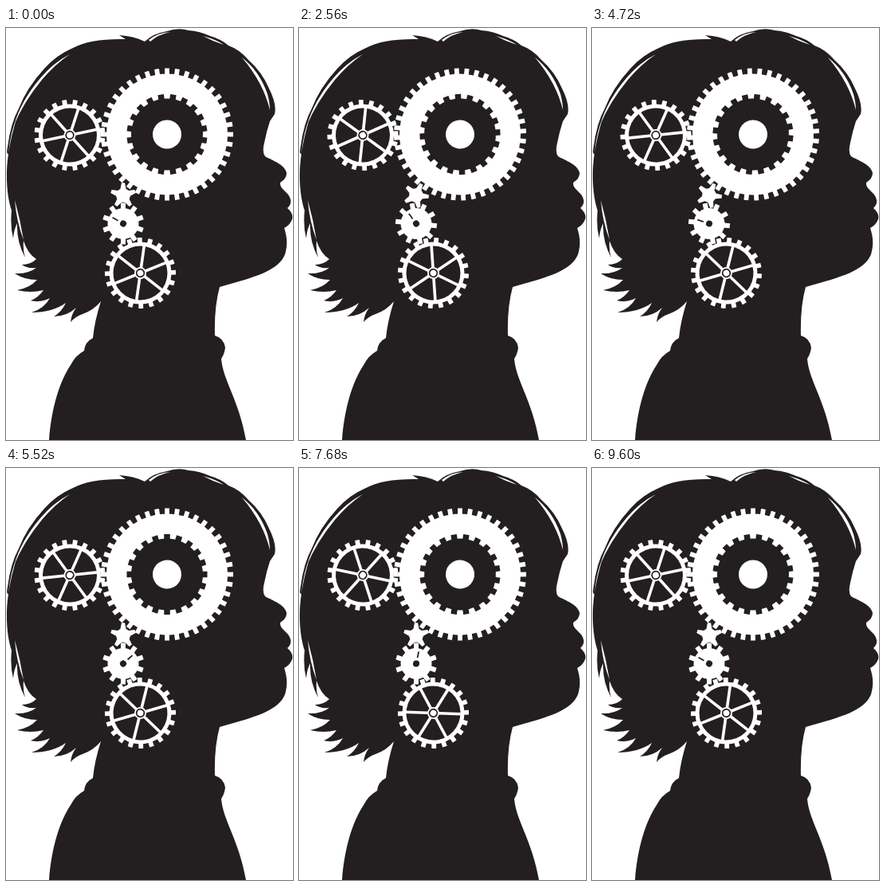
Animation of 360 by 517 pixels, one loop 9.68 s. Source, as an HTML page with a canvas:

```html
<!DOCTYPE html>
<html lang="en">
<head>
<meta charset="utf-8">
<title>Thinking gears</title>
<style>
  html, body { margin: 0; width: 100%; height: 100%; overflow: hidden; background: #fff; }
  canvas { display: block; width: 360px; height: 517px; }
</style>
</head>
<body>
<canvas id="stage" width="360" height="517"></canvas>
<script>
const ctx = document.getElementById('stage').getContext('2d');
const DARK = '#231f20', WHITE = '#fff';
const STEP_MS = 80, STEPS = 121, TAU = Math.PI * 2;
const rad = deg => deg * Math.PI / 180;

const head = new Path2D(`
  M142 9 Q160 10 174 17 Q184 7 202 4 Q216 -1 229 3 Q243 4 256 10
  Q270 14 279 22 Q293 27 304 40 Q321 55 330 76 Q340 96 337 108
  L331 117 Q327 129 324 144 Q321 156 325 161
  C333 166 350 171 352 182 Q352 189 344 194
  C343 203 356 206 357 216 Q358 221 353 226 C359 231 361 237 358 242
  Q356 247 349 251 C352 260 354 271 350 284 C342 304 315 312 268 325
  Q261 350 262 386 Q273 389 275 401 Q274 409 270 415
  C272 442 292 466 301 517 L54 517
  C57 477 67 444 81 423 Q87 411 98 405 Q99 394 109 389 Q111 368 119 343
  Q110 354 96 359 Q87 362 81 369 Q82 359 88 351 Q76 362 60 362
  Q70 356 75 345 Q58 357 32 357 Q48 352 55 339 Q43 345 31 342
  Q41 338 47 329 Q31 333 14 329 Q30 326 39 316 Q23 316 11 308
  Q27 309 38 301 Q26 302 20 297 Q31 297 38 290 Q27 283 22 267
  Q21 279 24 288 Q13 268 14 245 Q10 253 9 264 Q5 248 7 229
  C1 211 -1 184 3 158 Q0 159 2 149 Q6 119 16 101
  Q26 75 48 51 Q63 34 84 25 Q106 13 150 14 Z`);

const strands = new Path2D(`
  M10 122 Q19 91 43 63 Q60 43 80 33 Q61 46 45 65 Q22 93 10 122 Z
  M3 157 Q6 129 14 111 Q7 133 3 157 Z
  M179 15 Q190 6 206 5 Q191 8 181 17 Z
  M247 10 Q265 15 273 21 Q260 17 247 10 Z
  M296 37 Q318 54 328 83 Q331 94 331 103 Q323 69 296 37 Z
  M11 216 Q13 242 22 266 Q18 241 11 216 Z`);

function disc(r, color) {
  ctx.fillStyle = color;
  ctx.beginPath();
  ctx.arc(0, 0, r, 0, TAU);
  ctx.fill();
}

function cog(count, root, tip, width, color, phase = 0) {
  disc(root, color);
  for (let i = 0; i < count; i++) {
    ctx.save();
    ctx.rotate(rad(phase) + i * TAU / count);
    ctx.fillRect(root - 1, -width / 2, tip - root + 1, width);
    ctx.restore();
  }
}

function place(x, y, degrees, draw) {
  ctx.save();
  ctx.translate(x, y);
  ctx.rotate(rad(degrees));
  draw();
  ctx.restore();
}

function spokedWheel() {
  cog(20, 39, 44.5, 5.8, WHITE, 3);
  disc(34, DARK);
  ctx.fillStyle = WHITE;
  for (let i = 0; i < 6; i++) {
    ctx.fillRect(0, -1.8, 35, 3.6);
    ctx.rotate(TAU / 6);
  }
  disc(7.5, WHITE);
  disc(5.7, DARK);
  disc(3.9, WHITE);
}

function bigWheel() {
  cog(40, 76, 83, 5.8, WHITE);
  cog(20, 45, 50.5, 7.5, DARK, 9);
  disc(18, WHITE);
}

function star() {
  ctx.fillStyle = WHITE;
  ctx.beginPath();
  for (let i = 0; i < 5; i++) {
    const a = i * TAU / 5;
    for (const [r, offset] of [[9, -0.4], [16, -0.13], [16, 0.13], [9, 0.4]])
      ctx.lineTo(r * Math.cos(a + offset), r * Math.sin(a + offset));
  }
  ctx.fill();
}

function slottedCog() {
  cog(10, 19.5, 26, 6, WHITE, -12);
  disc(4, DARK);
  ctx.fillRect(7.5, -0.9, 8, 1.8);
}

function render(now) {
  const turn = Math.floor(now / STEP_MS) % STEPS * 3;
  ctx.fillStyle = WHITE;
  ctx.fillRect(0, 0, 360, 517);
  ctx.fillStyle = DARK;
  ctx.fill(head);
  ctx.fillStyle = WHITE;
  ctx.fill(strands);

  place(80, 134.5, -12 - 2 * turn, spokedWheel);
  place(202, 133.5, turn, bigWheel);
  place(147, 210, -90 - 8 * turn, star);
  place(147, 245.5, 210 + 4 * turn, slottedCog);
  place(168.5, 307.5, -22 - 2 * turn, spokedWheel);
}

const start = performance.now();
function tick() {
  render(performance.now() - start);
  requestAnimationFrame(tick);
}
tick();
</script>
</body>
</html>
```
